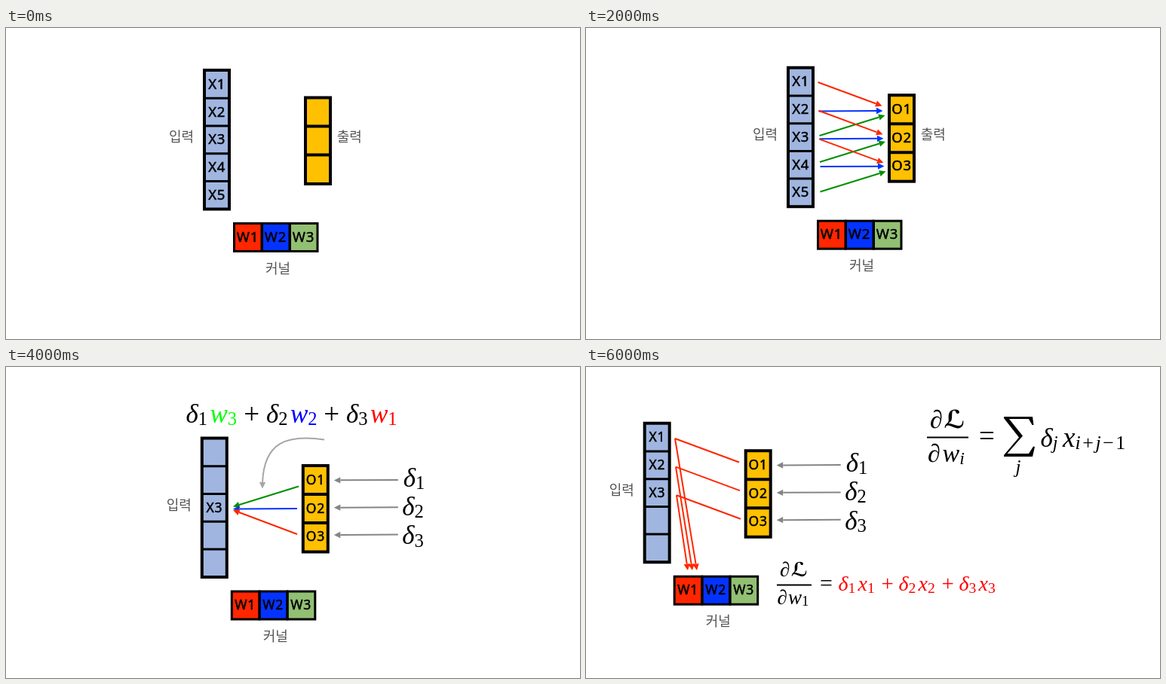
Write an HTML page with a canvas that moves like this. It is 761 by 413 pixels and loops after 7 s.

```html
<!DOCTYPE html>
<html lang="ko">
<head>
<meta charset="utf-8">
<style>
html, body { margin: 0; width: 100%; height: 100%; overflow: hidden; background: #fff; }
canvas { display: block; }
</style>
</head>
<body>
<canvas id="stage" width="761" height="413"></canvas>
<script>
const ctx = document.getElementById('stage').getContext('2d');
const RED = '#ff2600', BLUE = '#0433ff', GREEN = '#008f00', GRAY = '#858585', LEAF = '#92c073';
const STEP = 1000;

function text(str, x, y, font, color = '#000', align = 'center') {
  ctx.font = font;
  ctx.fillStyle = color;
  ctx.textAlign = align;
  ctx.fillText(str, x, y);
}

function box(x, y, w, h, fill, weight) {
  ctx.fillStyle = fill;
  ctx.fillRect(x, y, w, h);
  ctx.strokeStyle = '#000';
  ctx.lineWidth = weight;
  ctx.strokeRect(x, y, w, h);
}

function line(x1, y1, x2, y2, color, weight = 2) {
  ctx.strokeStyle = color;
  ctx.lineWidth = weight;
  ctx.beginPath();
  ctx.moveTo(x1, y1);
  ctx.lineTo(x2, y2);
  ctx.stroke();
}

function polygon(points, color) {
  ctx.fillStyle = color;
  ctx.beginPath();
  points.forEach(p => ctx.lineTo(...p));
  ctx.fill();
}

function arrow(x1, y1, x2, y2, color) {
  const a = Math.atan2(y2 - y1, x2 - x1), c = Math.cos(a), s = Math.sin(a);
  const bx = x2 - 8.5 * c, by = y2 - 8.5 * s;
  line(x1, y1, bx, by, color);
  polygon([[x2, y2], [bx - 4.2 * s, by + 4.2 * c], [bx + 4.2 * s, by - 4.2 * c]], color);
}

// Letters are italic, digits and operators upright; "_" lowers the next character.
function math(x, y, size, src, color = '#000') {
  for (const token of src.match(/_?./gu)) {
    const sub = token[0] === '_', ch = token.at(-1);
    const px = sub ? size * 0.7 : size;
    const pad = /[+−]/.test(ch) ? px * 0.1 : 0;
    const style = /[a-zδ∂]/.test(ch) ? 'italic ' : '';
    text(ch, x + pad, y + (sub ? size * 0.09 : 0), `${style}${px}px "Liberation Serif", serif`, color, 'left');
    x += ctx.measureText(ch).width + 2 * pad;
  }
}

const scriptL = (x, y, size) => text('ℒ', x, y, `bold ${size}px "DejaVu Sans", sans-serif`);

function diagram({ at, inputs = '', outputs = '', deltas }) {
  const cellFont = `500 ${deltas ? 17.5 : 18.5}px "Noto Sans", "Open Sans", sans-serif`;
  // A hairline outline gives the medium weight.
  const cell = (str, x, y) => {
    ctx.letterSpacing = '0.8px';
    text(str, x, y, cellFont);
    ctx.strokeStyle = '#000';
    ctx.lineWidth = 0.5;
    ctx.strokeText(str, x, y);
    ctx.letterSpacing = '0px';
  };
  const label = (str, x, y) =>
    text(str, x, y, '300 18px "Noto Sans CJK KR", "Noto Sans CJK", sans-serif', '#555');

  ctx.save();
  ctx.translate(...at);

  box(263, 56, 33, 184.5, '#a0b6e0', 4);
  for (let i = 1; i < 5; i++) line(263, 56.6 + 36.7 * i, 296, 56.6 + 36.7 * i, '#000', 3);
  for (const n of inputs) cell('X' + n, 279.7, 44 + 36.75 * n);

  box(397, 92.5, 33, 114.5, '#ffc000', 4);
  for (let i = 1; i < 3; i++) line(397, 92.5 + 38 * i, 430, 92.5 + 38 * i, '#000', 4);
  for (const n of outputs) cell('O' + n, 413.5, 80 + 37.5 * n);

  [RED, BLUE, LEAF].forEach((color, i) => {
    box(302.5 + 37 * i, 259.5, 36.5, 37, color, 3);
    cell('W' + (i + 1), 320.4 + 37 * i, 283.6);
  });

  label('입력', 232.5, 151);
  label('커널', 360.5, 325.5);
  if (!deltas) label('출력', 455.3, 151);
  else for (let i = 0; i < 3; i++) {
    arrow(523, 111.4 + 36.3 * i, 438, 111.9 + 36.3 * i, GRAY);
    math(i ? 528.5 : 530, 120.3 + 38.3 * i, 35, 'δ_' + (i + 1));
  }
  ctx.restore();
}

const redArrow = (x, y) => arrow(x, y, x + 85, y + 31.5, RED);
const blueArrow = (x, y) => arrow(x, y, x + 85, y - 0.5, BLUE);
const greenArrow = (x, y) => arrow(x, y, x + 87, y - 27, GREEN);

function weightedSum() {
  const term = (x, n, m, color) => {
    math(x, 74, 35, 'δ_' + n);
    math(x + 32, 74, 35, 'w_' + m, color);
  };
  term(238.5, 1, 3, '#0f0');
  term(345, 2, 2, '#00f');
  term(451, 3, 1, '#f00');
  math(311.5, 74.5, 37, '+');
  math(417.5, 74.5, 37, '+');
}

function kernelTuple() {
  const term = (x, n, color) => {
    math(x, 267, 34, 'δ_' + n, color);
    math(x + 32, 267, 34, 'x_3', color);
  };
  math(431, 267, 34, '(');
  term(444, 3, '#f00');
  math(505.5, 267, 34, ',');
  term(521, 2, '#00f');
  math(582.5, 267, 34, ',');
  term(598, 1, '#0f0');
  math(663, 267, 34, ')');
}

function gradients() {
  math(257, 278, 27, '∂');
  scriptL(283, 278, 26);
  line(253, 289.5, 299, 289.5, '#000', 1.8);
  math(253.5, 315, 27, '∂');
  math(268, 315, 27, 'w_1');
  math(310, 296.5, 30, '=');
  for (let i = 0; i < 3; i++) {
    math(334.5 + 80 * i, 297, 28, 'δ_' + (i + 1), '#f00');
    math(360.5 + 80 * i, 297, 28, 'x_' + (i + 1), '#f00');
    if (i) math(308.5 + 80 * i, 297, 29, '+', '#f00');
  }

  math(456, 81, 34, '∂');
  scriptL(488.5, 81, 33);
  line(452, 93.5, 507, 93.5, '#000', 2);
  math(453, 126, 34, '∂');
  math(472.5, 126, 34, 'w_i');
  math(521, 103.5, 37, '=');
  polygon([[554, 66], [592, 66], [593.5, 77], [591.5, 77], [587, 69], [561, 69], [579, 91.5],
    [558.5, 115], [587, 115], [593, 105.5], [595, 106], [592, 119], [554, 119], [554, 117],
    [574, 93.5], [554, 68]], '#000');
  math(569.5, 141, 25, 'j');
  math(602.5, 105.5, 35, 'δ_j');
  math(632, 105.5, 37, 'x_i_+_j_−_1');
}

const scenes = [
  { at: [0, 0], inputs: '12345' },
  {
    at: [19, 4], inputs: '12345', outputs: '1',
    draw() {
      redArrow(321.5, 79.5);
      blueArrow(322.5, 118);
      greenArrow(323, 151);
    }
  },
  {
    at: [5, -3.3], inputs: '12345', outputs: '123',
    draw() {
      for (let i = 0; i < 3; i++) {
        redArrow(307.5 + i, 72 + 37.8 * i);
        blueArrow(308.5 + i, 110.5 + 36.8 * i);
        greenArrow(309.5 + i / 2, [143, 178, 217.5][i]);
      }
    }
  },
  {
    at: [-16, -8.2], inputs: '3', outputs: '123', deltas: true,
    draw() {
      greenArrow(288, 138);
      blueArrow(288, 141);
      redArrow(288, 142.5);
      ctx.fillStyle = '#777';
      ctx.fillRect(544.5, 111.5, 1.5, 2);
    }
  },
  {
    at: [-3.2, 38.5], inputs: '3', outputs: '123', deltas: true,
    draw() {
      arrow(388, 158.5, 301, 185.5, GREEN);
      arrow(386, 188, 301, 188.5, BLUE);
      arrow(386, 222, 301, 190, RED);
      ctx.strokeStyle = '#a6a6a6';
      ctx.lineWidth = 2;
      ctx.beginPath();
      ctx.moveTo(422, 96.5);
      ctx.bezierCurveTo(372, 89, 342, 100, 340, 154);
      ctx.stroke();
      polygon([[340, 161.5], [335.8, 153], [344.2, 153]], '#a6a6a6');
      weightedSum();
    }
  },
  {
    at: [-5, 6.8], inputs: '3', outputs: '123', deltas: true,
    draw() {
      line(300, 156.5, 386, 126, GREEN);
      line(300, 156, 384, 155.5, BLUE);
      line(300, 157.5, 384, 189.5, RED);
      arrow(300, 157, 385, 259, GREEN);
      arrow(300, 157, 345, 256, BLUE);
      arrow(300, 157, 315.5, 258, RED);
      kernelTuple();
    }
  },
  {
    at: [-185.3, 18.7], inputs: '123', outputs: '123', deltas: true,
    draw() {
      for (let i = 0; i < 3; i++) {
        const x = 118 + i, y = 95 + 37.6 * i;
        line(x, y, x + 85, y + 31.5, RED);
        arrow(x, y, 147 - 6 * i, 270, RED);
      }
      gradients();
    }
  }
];

function render() {
  const scene = scenes[Math.floor(performance.now() / STEP) % scenes.length];
  ctx.fillStyle = '#fff';
  ctx.fillRect(0, 0, 761, 413);
  diagram(scene);
  scene.draw?.();
  requestAnimationFrame(render);
}
render();
</script>
</body>
</html>
```
